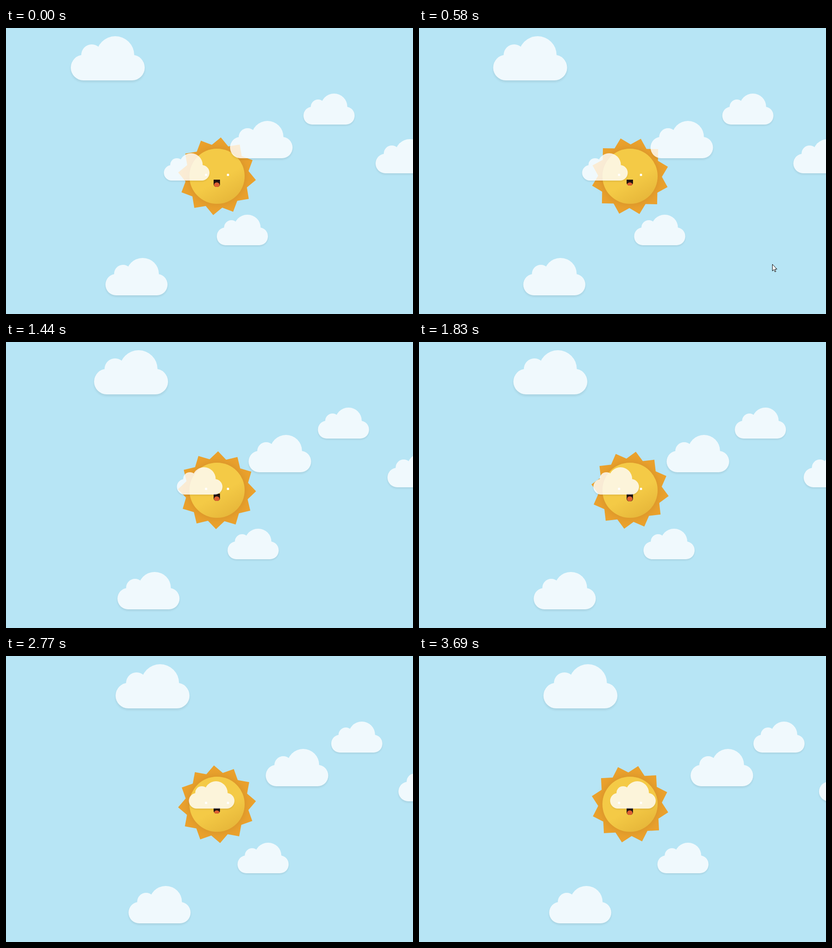
An HTML page without scripts for the animation above (3.77 s loop, 892 by 628 pixels).

```html
<!DOCTYPE html>
<html lang="en">
<head>
<meta charset="utf-8">
<title>Sun and clouds</title>
<style>
  /* Elapsed seconds; every moving part derives its pose from it. */
  @property --t { syntax: "<number>"; inherits: true; initial-value: 0; }

  html, body { margin: 0; width: 100%; height: 100%; overflow: hidden; background: #b7e5f5; }
  body { position: relative; animation: clock 3770ms infinite; }
  div, i, svg { position: absolute; }

  /* Uneven ticks: each segment is split into whole pictures. */
  @keyframes clock {
    0%      { --t: 0;    animation-timing-function: steps(8); }
    15.384% { --t: .58;  animation-timing-function: steps(1); }
    16.976% { --t: .64;  animation-timing-function: steps(8); }
    32.625% { --t: 1.23; animation-timing-function: steps(3); }
    38.196% { --t: 1.44; animation-timing-function: steps(1); }
    40.848% { --t: 1.54; animation-timing-function: steps(4); }
    48.541% { --t: 1.83; animation-timing-function: steps(5); }
    58.09%  { --t: 2.19; animation-timing-function: steps(1); }
    59.946% { --t: 2.26; animation-timing-function: steps(2); }
    63.66%  { --t: 2.4;  animation-timing-function: steps(5); }
    73.474% { --t: 2.77; animation-timing-function: steps(1); }
    75.862% { --t: 2.86; animation-timing-function: steps(2); }
    79.31%  { --t: 2.99; animation-timing-function: steps(2); }
    84.35%  { --t: 3.18; animation-timing-function: steps(1); }
    86.472% { --t: 3.26; animation-timing-function: steps(3); }
    92.042% { --t: 3.47; animation-timing-function: steps(1); }
    94.429% { --t: 3.56; animation-timing-function: steps(2); }
    97.877% { --t: 3.69; animation-timing-function: steps(1); }
    100%    { --t: 3.77; }
  }

  .sun { left: 402px; top: 265px; width: 121px; height: 121px; }
  .ray, .face { inset: 0; }
  .ray {
    background: #eaa12d;
    transform: rotate(calc(var(--turn) - 9.4deg + 18deg * var(--t)));
  }
  .face {
    border-radius: 50%;
    background: linear-gradient(150deg, #f4ca46 55%, #e2b035);
    box-shadow: 0 0 20px rgba(0, 0, 0, .1);
  }
  .eye { top: 55px; width: 5px; height: 5px; border-radius: 1.5px; background: #fffdf5; }
  .mouth {
    left: 53px; top: 68px; width: 14px;
    height: calc(14.7px + 1.9px * cos(2.92 * var(--t) + .95));
    border-radius: 0 0 6px 6px;
    background: #231510;
    overflow: hidden;
  }
  .tongue { left: 1px; top: 6px; width: 12px; height: 11px; border-radius: 50%; background: #de6132; }

  /* --u: size of one drawing unit, --v: drift per second */
  .cloud {
    left: var(--x);
    top: calc(var(--y) + 90 * var(--u));
    width: calc(350 * var(--u));
    height: calc(120 * var(--u));
    border-radius: calc(60 * var(--u));
    background: #fff;
    box-shadow: 0 calc(8 * var(--u)) calc(12 * var(--u)) rgba(0, 0, 0, .1);
    opacity: .8;
    transform: translateX(calc(var(--v) * var(--t)));
  }
  .cloud::before, .cloud::after {
    content: "";
    position: absolute;
    top: calc(var(--d) / -2);
    width: var(--d);
    height: var(--d);
    border-radius: 50%;
    background: #fff;
  }
  .cloud::before { --d: calc(100 * var(--u)); left: calc(50 * var(--u)); }
  .cloud::after { --d: calc(180 * var(--u)); right: calc(50 * var(--u)); }

  .cursor {
    left: 774px; top: 518px;
    visibility: hidden;
    animation: pass 3770ms step-end infinite;
  }
  @keyframes pass {
    0%      { visibility: hidden; }
    13.46%  { visibility: visible; transform: translate(-4px, 80px); }
    15.384% { visibility: visible; transform: none; }
    16.976%, 100% { visibility: hidden; }
  }
</style>
</head>
<body>
  <div class="sun">
    <i class="ray" style="--turn:0deg"></i>
    <i class="ray" style="--turn:30deg"></i>
    <i class="ray" style="--turn:60deg"></i>
    <div class="face">
      <i class="eye" style="left:33.5px"></i>
      <i class="eye" style="left:81.5px"></i>
      <div class="mouth"><i class="tongue"></i></div>
    </div>
  </div>

  <div class="cloud" style="--x:142px; --y:17.6px; --u:.4625px; --v:35.45px"></div>
  <div class="cloud" style="--x:651.5px; --y:144.4px; --u:.32px; --v:21.95px"></div>
  <div class="cloud" style="--x:490.7px; --y:204px; --u:.391px; --v:28.25px"></div>
  <div class="cloud" style="--x:346.1px; --y:274.9px; --u:.2846px; --v:19.75px"></div>
  <div class="cloud" style="--x:810.1px; --y:244px; --u:.356px; --v:18.1px"></div>
  <div class="cloud" style="--x:461.5px; --y:409.6px; --u:.32px; --v:16.4px"></div>
  <div class="cloud" style="--x:217.5px; --y:504.6px; --u:.391px; --v:18.25px"></div>

  <svg class="cursor" width="12" height="19" viewBox="0 0 12 19">
    <path d="M.5 .8V15.5L3.8 12.3 6 17.4 8.2 16.5 6 11.5H10.5Z" fill="#fff" stroke="#000"/>
  </svg>
</body>
</html>
```
